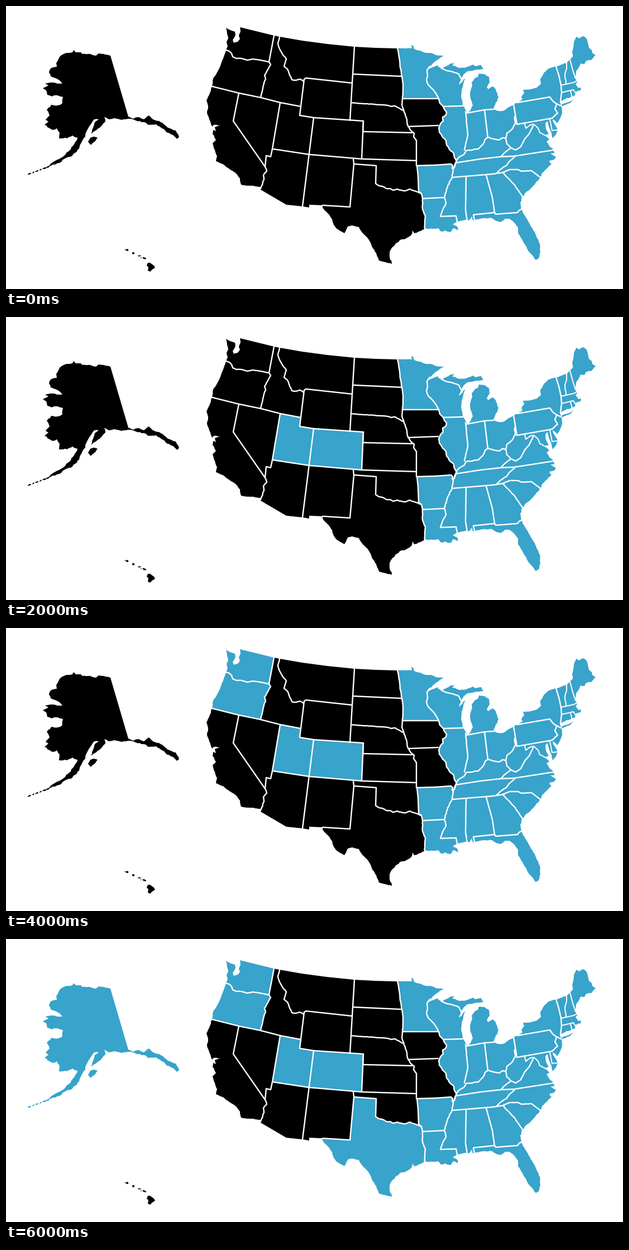
Recreate the animation shown at these times as a matplotlib script. Size 1105x507 px, loop 7000 ms.

```python
import numpy as np
import matplotlib.pyplot as plt
from matplotlib.animation import FuncAnimation
from matplotlib.patches import Polygon

W, H, DPI = 1105, 507, 100
BLUE, BLACK, WHITE = "#38a3cb", "#000000", "#ffffff"
rng = np.random.default_rng(4)


def line(*xy):
    return np.array(xy, float).reshape(-1, 2)


def rough(amp, *xy):
    """Polyline with small seeded ripples between its fixed points."""
    points = line(*xy)
    out = [points[:1]]
    for a, b in zip(points, points[1:]):
        n = max(1, int(np.hypot(*(b - a)) / 3.5))
        t = np.arange(1, n + 1)[:, None] / n
        step = a + (b - a) * t
        step[:-1] += rng.uniform(-amp, amp, (n - 1, 2))
        out.append(step)
    return np.concatenate(out)


def join(*parts):
    return np.concatenate(parts)


fig = plt.figure(figsize=(W / DPI, H / DPI), dpi=DPI, facecolor=WHITE)
ax = fig.add_axes([0, 0, 1, 1])
ax.set_xlim(0, W)
ax.set_ylim(H, 0)
ax.axis("off")


def land(points, color=BLACK):
    return ax.add_patch(Polygon(points, closed=True, fc=color, ec="none", lw=0, zorder=1))


def border(points, width=2.4):
    ax.plot(*points.T, color=WHITE, lw=width * 72 / DPI, zorder=3,
            solid_joinstyle="round", solid_capstyle="round")


# Line between the eastern and western halves, north to south
mn_west = rough(.4, 701, 76, 704, 92, 706, 110, 709, 126, 711, 140, 711, 151, 710, 166)
mn_south = line(710, 166, 775, 166)
miss_upper = rough(.6, 775, 166, 777, 174, 783, 180, 785, 185, 789, 190, 788, 195, 782, 199,
                   783, 206, 778, 211, 775, 219, 776, 226, 782, 235, 788, 241, 789, 249,
                   796, 259, 802, 264, 803, 271, 807, 277, 805, 283)
mo_south = line(805, 283, 803, 289, 799, 291, 800, 286, 797, 283, 770, 285, 736, 286)
ok_ar = line(736, 286, 738, 305, 739, 332, 744, 336)
tx_la = rough(.5, 744, 336, 746, 346, 746, 364, 751, 376, 750, 388, 750, 400)
divide = join(mn_west, mn_south, miss_upper, mo_south, ok_ar)

# Borders of the western states
wa_or = rough(.4, 394, 79, 400, 81, 404, 85, 406, 91, 413, 94, 422, 94, 432, 97, 442, 95, 455, 97, 471, 100)
wa_id = line(480, 53, 471, 100)
or_id = rough(.4, 471, 100, 474, 105, 469, 114, 463, 124, 465, 131, 462, 138, 456, 164)
or_south = line(369, 144, 417, 156, 456, 164)
red_river = rough(.6, 662, 318, 668, 322, 674, 323, 681, 327, 688, 327, 693, 330, 701, 328,
                  708, 330, 716, 331, 723, 328, 731, 331, 737, 333, 744, 336)
tx_north = join(line(567, 357, 616, 360, 623, 283, 663, 286, 662, 318), red_river)

# Coasts and national borders
wa_coast = rough(.5, 394, 79, 397, 72, 395, 64, 398, 58, 396, 50, 394, 39, 401, 43, 410, 46,
                 411, 52, 406, 61, 408, 66, 415, 64, 419, 59, 417, 53, 420, 46, 419, 38)
or_coast = rough(.5, 369, 144, 371, 130, 377, 121, 384, 107, 390, 91, 394, 79)
rim = line(480, 53, 490, 55, 530, 62, 575, 68, 624, 73, 662, 75, 701, 76)
south_west = line(567, 357, 543, 356, 543, 361, 531, 359, 502, 356, 456, 329, 457, 324)
ca_coast = rough(.7, 457, 324, 421, 320, 419, 309, 411, 299, 403, 294, 394, 288, 390, 284, 376, 278,
                 378, 269, 374, 258, 370, 246, 376, 240, 370, 229, 371, 222, 376, 224, 374, 217,
                 384, 214, 372, 213, 369, 216, 366, 207, 360, 192, 362, 179, 359, 169, 365, 156, 369, 144)
tx_coast = rough(1, 750, 400, 739, 404, 731, 407, 728, 402, 726, 410, 717, 416, 709, 418, 700, 424,
                 692, 432, 687, 441, 687, 450, 691, 462)
rio_grande = rough(.6, 691, 462, 680, 459, 668, 456, 663, 443, 655, 430, 648, 416, 638, 406,
                   632, 396, 620, 393, 612, 395, 606, 407, 594, 400, 587, 392, 584, 382,
                   576, 371, 567, 361, 567, 357)
superior = rough(.5, 701, 76, 727, 76, 726, 70, 729, 71, 731, 77, 741, 80, 752, 84, 761, 84,
                 770, 88, 784, 89, 770, 98, 759, 108, 757, 113, 766, 109, 773, 106, 775, 110,
                 782, 111, 790, 107, 796, 103, 803, 102, 799, 107, 803, 107, 812, 111, 824, 110,
                 836, 105, 841, 108, 851, 106, 855, 113, 844, 114)
lake_michigan = rough(.6, 844, 114, 835, 116, 826, 117, 820, 122, 815, 130, 811, 141, 817, 136, 822, 129,
                      819, 140, 816, 150, 815, 162, 818, 178, 823, 186, 826, 191, 831, 188, 836, 178,
                      832, 166, 831, 156, 835, 143, 834, 137, 840, 129, 845, 127, 847, 121)
huron_erie = rough(.6, 847, 121, 857, 122, 865, 127, 866, 137, 861, 146, 864, 149, 872, 144, 877, 149,
                   882, 163, 880, 170, 877, 173, 873, 185, 881, 188, 890, 188, 899, 182, 909, 177,
                   925, 167, 923, 163, 928, 156, 926, 150, 940, 149, 951, 146, 958, 140, 957, 130,
                   964, 119, 972, 112, 985, 108, 1004, 102, 1010, 96)
maine = rough(.8, 1010, 96, 1015, 91, 1014, 83, 1016, 75, 1017, 65, 1021, 55, 1027, 58, 1033, 54, 1040, 59,
              1044, 75, 1049, 79, 1050, 84, 1056, 88, 1048, 97, 1040, 98, 1036, 104, 1029, 103,
              1026, 110, 1021, 117, 1020, 130, 1023, 137, 1020, 140, 1025, 147, 1030, 146, 1029, 151,
              1020, 154, 1019, 160, 1012, 163, 1001, 167, 992, 172)
mid_atlantic = rough(.5, 992, 172, 995, 181, 996, 192, 992, 202, 987, 210, 984, 206, 979, 203, 980, 208,
                     984, 214, 988, 222, 985, 230, 979, 237, 977, 228, 974, 221, 971, 212, 970, 206,
                     966, 210, 967, 220, 972, 229, 966, 231, 973, 239, 968, 243, 974, 252, 981, 258)
carolinas = rough(.8, 981, 258, 982, 264, 975, 264, 985, 270, 982, 275, 973, 277, 977, 283, 969, 291,
                  960, 299, 957, 307, 948, 318, 939, 328, 929, 336, 925, 342, 921, 352, 923, 364)
florida = rough(.6, 923, 364, 930, 377, 940, 395, 948, 408, 956, 426, 957, 441, 954, 452, 949, 455,
                942, 446, 935, 438, 929, 427, 922, 415, 917, 407, 917, 397, 911, 389, 901, 381,
                894, 381, 886, 387, 878, 385, 870, 380, 856, 380, 846, 382, 836, 384, 834, 377,
                829, 384, 823, 383, 808, 386)
delta = rough(1, 808, 386, 800, 391, 808, 395, 809, 402, 800, 398, 796, 405, 786, 402, 779, 404,
              774, 398, 764, 399, 750, 398)

land(join(superior, lake_michigan, huron_erie, maine, mid_atlantic, carolinas, florida, delta,
          tx_la[::-1], divide[::-1]), BLUE)
land(rough(.4, 994, 180, 996, 176, 1008, 172, 1017, 167, 1010, 174, 994, 180), BLUE)
land(join(rim, divide, tx_north[::-1], south_west, ca_coast, or_south, or_id[::-1], wa_id[::-1]))

utah = land(line(491, 173, 528, 180, 526, 196, 551, 200, 543, 266, 477, 256))
colorado = land(line(551, 200, 640, 206, 637, 274, 543, 266))
washington = land(join(wa_coast, wa_id, wa_or[::-1]))
oregon = land(join(or_coast, wa_or, or_id, or_south[::-1]))
texas = land(join(tx_north, tx_la, tx_coast, rio_grande))

ak_north = rough(.8, 66, 147, 76, 142, 70, 139, 82, 137, 92, 139, 101, 139, 97, 134, 88, 129, 80, 126,
                 77, 119, 80, 112, 91, 109, 90, 102, 96, 91, 108, 84, 119, 83, 121, 79, 125, 83,
                 134, 83, 137, 86, 151, 86, 161, 89, 166, 85, 178, 87, 187, 89)
ak_east = rough(.9, 219, 198, 228, 202, 238, 199, 247, 203, 256, 196, 263, 203, 274, 206, 283, 212, 290, 218,
                304, 223, 310, 235, 306, 238, 299, 231, 289, 227, 279, 219, 269, 212, 256, 213, 246, 208,
                232, 205, 219, 202, 207, 204, 194, 201, 184, 203, 176, 199)
ak_west = rough(1.1, 176, 199, 178, 207, 170, 216, 161, 223, 152, 229, 156, 218, 159, 208, 166, 203, 158, 203,
                151, 213, 144, 225, 142, 234, 133, 248, 127, 261, 116, 270, 104, 274, 96, 281, 84, 284,
                74, 288, 87, 278, 102, 270, 108, 263, 116, 257, 124, 244, 128, 236, 119, 232, 109, 237,
                95, 237, 96, 227, 91, 219, 83, 222, 78, 219, 69, 213, 76, 207, 71, 204, 78, 196, 73, 186,
                81, 177, 93, 178, 101, 174, 102, 163, 92, 160, 82, 162, 74, 159, 72, 151, 66, 147)
alaska = [land(join(ak_north, ak_east, ak_west)),
          land(rough(.8, 147, 243, 151, 236, 157, 234, 164, 236, 160, 242, 152, 249, 147, 243))]


def island(x, y, w, h, tilt=0):
    a = np.linspace(0, 2 * np.pi, 9)[:-1]
    r = rng.uniform(.8, 1.1, 8)
    return land(np.c_[x + w * r * np.cos(a), y + h * r * np.sin(a) + tilt * r * np.cos(a)])


alaska += [island(x, 301 - (x - 41) * .37, w, 1.4, -1)
           for x, w in ((42, 3), (49, 2), (55, 3), (62, 2), (69, 4), (75, 3))]

for spec in ((217, 437, 2.8, 2), (228, 443, 2.5, 2), (239, 447.5, 3, 1), (248, 452, 3.6, 1.8, 1),
             (242, 451, 1, .8), (213.5, 436.5, .9, 1)):
    island(*spec)
land(rough(.3, 254, 460, 258, 460, 262, 463, 265, 465, 267, 469, 262, 472, 258, 476, 254, 474, 255, 468, 252, 465))

# Western borders
for edge in (divide, tx_la, wa_or, wa_id, or_id, or_south, tx_north):
    border(edge)
border(line(456, 164, 491, 173, 528, 180))
border(rough(.5, 490, 54, 487, 68, 490, 77, 495, 86, 502, 95, 498, 108, 504, 113, 507, 121, 512, 132,
             519, 133, 526, 131, 533, 135))
border(line(620, 138, 537, 129, 534, 131, 526, 196, 551, 200, 640, 206, 637, 274))
border(line(624, 73, 620, 138, 616, 205))
border(line(622, 122, 709, 126))
border(rough(.4, 618, 173, 683, 178, 690, 180, 697, 179, 711, 187))
border(rough(.4, 710, 166, 709, 177, 713, 190, 717, 200, 719, 213, 724, 222, 731, 228, 730, 234, 735, 241))
border(line(640, 206, 639, 225, 727, 227))
border(line(720, 216, 774, 214))
border(line(735, 241, 735, 286))
border(line(477, 256, 543, 266, 637, 274, 735, 277))
border(line(622, 274, 623, 283))
border(line(551, 200, 531, 359))
border(line(417, 156, 407, 206, 464, 288))
border(line(491, 173, 477, 256, 474, 270, 466, 268, 464, 288))
border(rough(.5, 464, 288, 467, 296, 461, 303, 462, 311, 456, 327))

# Great Lakes and Ohio valley
border(rough(.4, 759, 108, 754, 115, 755, 125, 753, 132, 756, 141, 765, 150, 770, 157, 775, 166))
border(rough(.4, 779, 111, 787, 115, 800, 118, 811, 122, 815, 130))
border(line(783, 180, 818, 179))
border(rough(.4, 823, 189, 827, 232, 824, 244, 821, 258))
border(line(824, 192, 857, 186, 873, 185))
border(line(857, 186, 863, 236))
border(rough(.6, 806, 278, 811, 271, 820, 266, 824, 259, 835, 258, 846, 256, 854, 248, 858, 239, 863, 235,
             872, 238, 883, 240, 889, 236, 895, 237, 897, 228, 906, 221, 912, 211, 911, 198))
border(rough(.4, 895, 237, 897, 247, 904, 254, 894, 262, 886, 270))
border(rough(.5, 904, 254, 913, 258, 922, 252, 929, 238, 937, 229, 944, 214))

# Southern states
border(line(805, 281, 850, 274, 886, 270, 910, 269, 981, 258))
border(rough(.5, 805, 281, 801, 292, 799, 307, 791, 322, 785, 343, 788, 354, 782, 365, 778, 377))
border(line(778, 377, 806, 376, 808, 386))
border(line(746, 345, 785, 343))
border(line(799, 307, 824, 305, 872, 301, 892, 298))
border(rough(.4, 878, 300, 885, 293, 896, 286, 903, 277, 911, 270))
border(line(824, 306, 823, 366, 826, 385))
border(line(860, 303, 871, 343, 875, 370))
border(line(839, 383, 837, 374, 875, 370, 877, 373, 916, 370, 919, 366, 923, 364))
border(rough(.5, 890, 298, 899, 308, 912, 322, 925, 342))
border(line(890, 298, 902, 293, 917, 293, 923, 296, 941, 295, 957, 307))

# Northeast
border(line(909, 176, 915, 212, 978, 201))
border(rough(.4, 929, 210, 931, 219, 939, 213, 945, 212, 953, 219, 956, 227, 968, 233), 2)
border(line(974, 203, 978, 223, 987, 222), 2)
border(rough(.4, 978, 201, 988, 192, 983, 184, 986, 175, 980, 171, 974, 163))
border(line(916, 173, 974, 163))
border(line(986, 175, 994, 179))
border(line(985, 108, 990, 124, 994, 142, 995, 155, 993, 172))
border(rough(.4, 1004, 102, 1004, 112, 1001, 122, 1003, 139), 2)
border(line(994, 142, 1017, 137, 1022, 134), 2)
border(line(995, 155, 1016, 150, 1021, 157), 2)
border(line(1011, 152, 1014, 164), 2)
border(line(1010, 96, 1015, 115, 1020, 130), 2)

turning = [[colorado], [utah], [washington], [oregon], [texas], alaska]


def update(frame):
    for turn, patches in enumerate(turning, 1):
        for patch in patches:
            patch.set_facecolor(BLUE if frame >= turn else BLACK)
    return sum(turning, [])


anim = FuncAnimation(fig, update, frames=7, interval=1000, repeat=True, repeat_delay=0)
plt.show()
```
